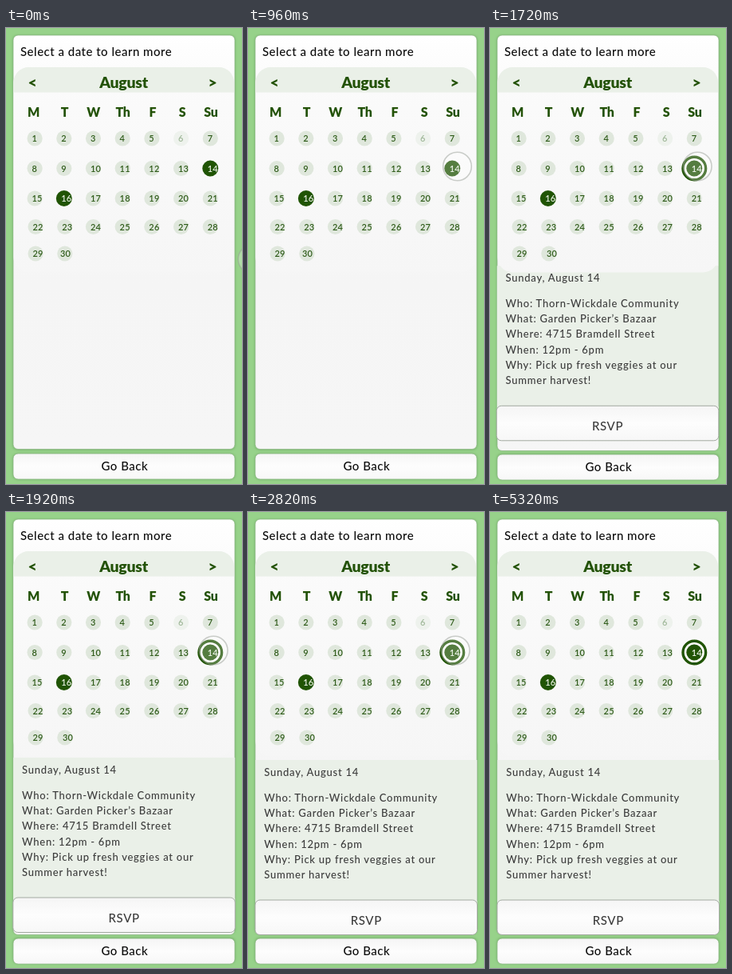
Write an HTML page that moves like this. It is 296x570 px and loops after 5.38 s.

```html
<!DOCTYPE html>
<html lang="en">
<head>
<meta charset="utf-8">
<title>Event calendar</title>
<style>
html, body { margin: 0; width: 100%; height: 100%; overflow: hidden; background: #97d28a; }
svg { display: block; width: 296px; height: 570px; font-family: Lato, "Open Sans", sans-serif; font-weight: 500; }
.label { font-size: 15px; letter-spacing: .5px; fill: #0c0c0c; }
.head { font-weight: 900; fill: #235207; text-anchor: middle; }
.month { font-size: 19.5px; letter-spacing: -.3px; }
.weekday { font-size: 16px; letter-spacing: -.3px; }
.day { font-size: 11px; letter-spacing: .2px; font-weight: 600; fill: #2f5c1a; }
.info { font-size: 13px; letter-spacing: .75px; fill: #3c3c3c; }
.rsvp { font-size: 15px; letter-spacing: .6px; fill: #3c3c3c; text-anchor: middle; }
</style>
</head>
<body>
<svg id="stage" viewBox="0 0 296 570">
  <defs>
    <linearGradient id="panelFill" x2="0" y2="1">
      <stop offset="0" stop-color="#fff"/>
      <stop offset=".14" stop-color="#fafafa"/>
      <stop offset=".6" stop-color="#f5f5f5"/>
      <stop offset="1" stop-color="#f6f6f6"/>
    </linearGradient>
    <linearGradient id="calFill" x2="0" y2="1">
      <stop offset="0" stop-color="#fbfbfb"/>
      <stop offset="1" stop-color="#f6f6f6"/>
    </linearGradient>
    <linearGradient id="buttonFill" x2="0" y2="1">
      <stop offset="0" stop-color="#f5f5f5"/>
      <stop offset=".5" stop-color="#fdfdfd"/>
      <stop offset="1" stop-color="#f7f7f7"/>
    </linearGradient>
    <filter id="soft" x="-10%" y="-10%" width="120%" height="120%">
      <feGaussianBlur stdDeviation="1.5"/>
    </filter>
    <clipPath id="calClip"><rect x="9.5" y="49" width="276.5" height="256.5" rx="19"/></clipPath>
  </defs>

  <rect width="296" height="570" fill="#97d28a"/>
  <g fill="#5f9a52" opacity=".55" filter="url(#soft)">
    <rect x="8.5" y="9" width="279" height="518.5" rx="6"/>
    <rect x="8.5" y="532" width="279" height="32.5" rx="6"/>
  </g>
  <rect id="panel" x="9" y="9" width="278" height="517.5" rx="6" fill="url(#panelFill)" stroke="#8fb886" stroke-width=".8"/>
  <text class="label" x="18" y="35">Select a date to learn more</text>
  <g id="back">
    <rect x="9" y="532" width="278" height="32" rx="6" fill="url(#buttonFill)" stroke="#8fb886" stroke-width=".8"/>
    <text class="label" x="119.5" y="553">Go Back</text>
  </g>

  <g id="sheet">
    <rect x="9.5" y="310" width="278" height="190" fill="#eaf0e8"/>
    <path d="M287.6 310V486" stroke="#9db897" stroke-width=".7"/>
    <g id="info"></g>
    <rect x="9" y="485" width="278.5" height="43.5" rx="6" fill="url(#buttonFill)" stroke="#a3aaa1"/>
    <text class="rsvp" x="148.3" y="516">RSVP</text>
  </g>

  <g clip-path="url(#calClip)">
    <rect x="9" y="49" width="278" height="257" fill="url(#calFill)"/>
    <rect x="9" y="49" width="278" height="31.5" fill="#eaf0e8"/>
  </g>
  <text class="head month" x="33" y="75">&lt;</text>
  <text class="head month" x="147.5" y="75">August</text>
  <text class="head month" x="259" y="75">&gt;</text>
  <g id="weekdays"></g>
  <g id="ring">
    <circle cx="256.3" cy="175.5" r="14.3" fill="#fff" stroke="#205404" stroke-width="3.4"/>
  </g>
  <g id="days"></g>

  <circle id="cursor" r="17.8" fill="#fff" fill-opacity=".24" stroke="#9a9f98" stroke-opacity=".5" stroke-width="1.6"/>
</svg>
<script>
const LOOP = 5380;
const NS = "http://www.w3.org/2000/svg";
const $ = id => document.getElementById(id);

function add(parent, tag, attrs, text = "") {
  const el = document.createElementNS(NS, tag);
  for (const key in attrs) el.setAttribute(key, attrs[key]);
  el.textContent = text;
  parent.append(el);
  return el;
}

const weekdayX = [34.5, 73.5, 109.5, 146.5, 184, 221, 257];
["M", "T", "W", "Th", "F", "S", "Su"].forEach((name, i) =>
  add($("weekdays"), "text", { class: "head weekday", x: weekdayX[i], y: 111.3 }, name));

const rowY = [138, 175.5, 213, 248.5, 282];
let lastDay;
for (let day = 1; day <= 30; day++) {
  const col = (day - 1) % 7, row = Math.floor((day - 1) / 7);
  const marked = day === 14 || day === 16;
  const cx = 36.1 + col * 36.7 + (row > 2 && col < 2 ? 1 : 0);
  const cy = rowY[row];
  add($("days"), "circle", { cx, cy, r: marked ? 10 : 9.6,
    fill: marked ? "#205404" : day === 6 ? "#eef2ed" : "#dfe7dc" });
  const label = add($("days"), "text", { class: "day", x: cx - 3.6, y: cy + 4.4 }, day);
  if (marked) label.style.fill = "#e6efe2";
  if (day === 6) label.style.fill = "#9fb798";
  lastDay = label;
}
const lastDayX = 68;

const info = [
  [330, "Sunday, August 14"],
  [362, "Who: Thorn-Wickdale Community"],
  [381, "What: Garden Picker’s Bazaar"],
  [400, "Where: 4715 Bramdell Street"],
  [419.5, "When: 12pm - 6pm"],
  [438.5, "Why: Pick up fresh veggies at our"],
  [458, "Summer harvest!"]
];
for (const [y, line] of info) add($("info"), "text", { class: "info", x: 20.3, y }, line);

const span = (t, from, to) => Math.min(1, Math.max(0, (t - from) / (to - from)));

function cursorAt(t) {
  const left = 1 - span(t, 10, 910);
  const settle = span(t, 1100, 1500);
  const leave = span(t, 2830, 3220) ** 2;
  return [
    262.5 + 46.5 * left ** 1.33 - 2.3 * settle + 56 * leave,
    173 + 116 * left ** 2 + 27 * leave
  ];
}

function render(t) {
  const [x, y] = cursorAt(t);
  $("cursor").setAttribute("transform", `translate(${x} ${y})`);

  // The sheet slides down from behind the calendar while fading in.
  const rest = (1 - span(t, 1190, 2244)) ** 3;
  const shown = Math.min(1, (1 - rest) * 1.3);
  $("sheet").setAttribute("transform", `translate(${-6 * rest} ${-104 * rest})`);
  $("sheet").setAttribute("opacity", shown);
  $("ring").setAttribute("opacity", shown);
  $("panel").setAttribute("height", 517.5 + 2 * shown);
  $("back").setAttribute("transform", `translate(0 ${shown})`);
  lastDay.setAttribute("x", lastDayX + 3 * shown);
}

function tick() {
  render(performance.now() % LOOP);
  requestAnimationFrame(tick);
}
tick();
</script>
</body>
</html>
```
